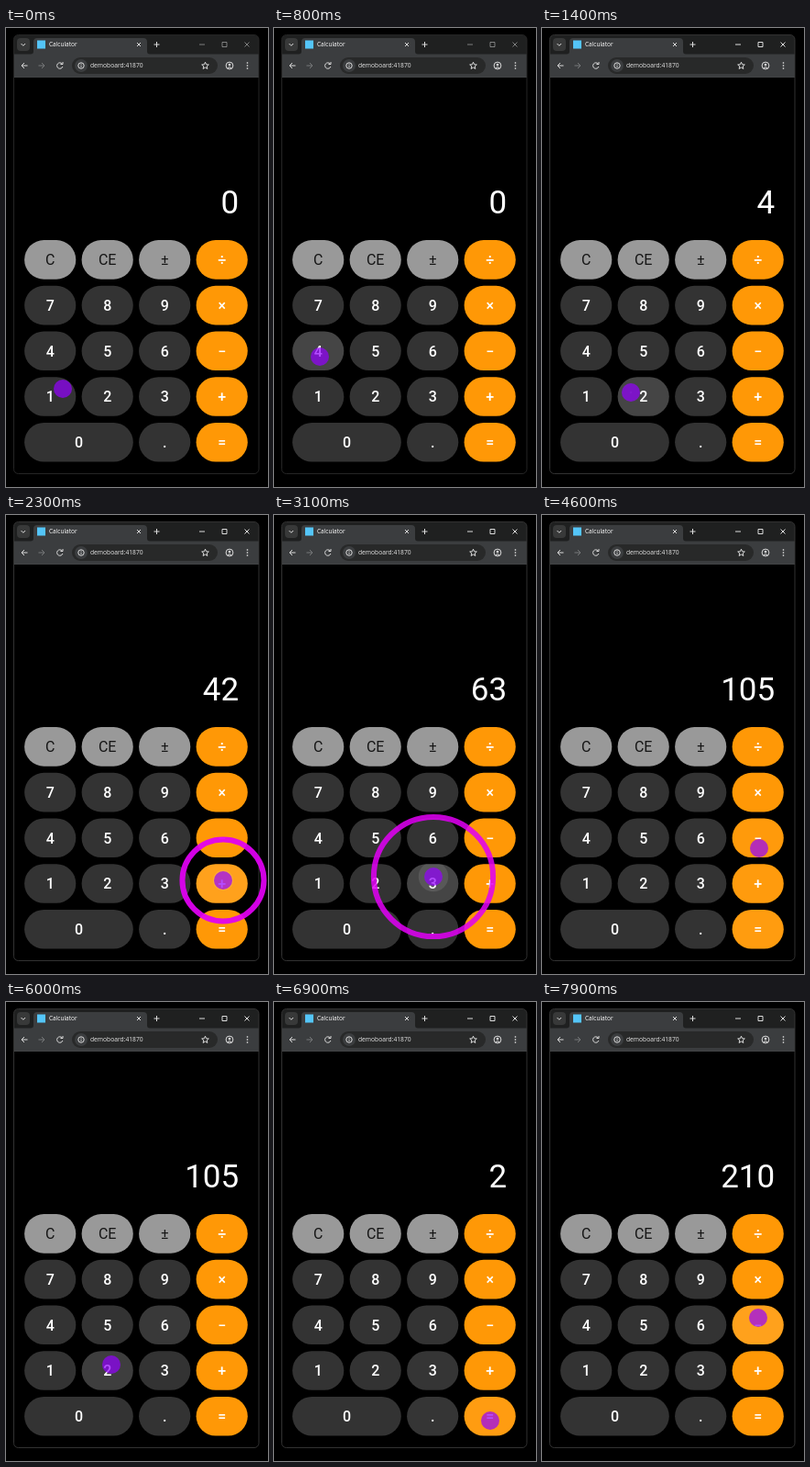
Recreate the animation shown at these times as an HTML page. Size 286x500 px, loop 8000 ms.

```html
<!DOCTYPE html>
<html lang="en">
<head>
<meta charset="utf-8">
<title>Calculator</title>
<style>
  html, body { margin: 0; width: 100%; height: 100%; overflow: hidden; background: #000; }
  svg { display: block; width: 286px; height: 500px; }
  .ui { font-family: "Open Sans", "Noto Sans", sans-serif; }
  .key, #display { font-family: Roboto, sans-serif; }
  .key { font-size: 16px; font-weight: 500; text-anchor: middle; fill: #fff; }
  .key.soft { font-weight: 400; fill: #161616; }
  #display { font-size: 35px; text-anchor: end; fill: #fff; }
  .line { fill: none; stroke: #dcdcdc; stroke-width: 1; }
</style>
</head>
<body>
<svg id="stage" viewBox="0 0 286 500" xmlns="http://www.w3.org/2000/svg">
  <defs id="defs"></defs>
  <rect width="286" height="500" fill="#000"/>
  <!-- browser window -->
  <path d="M8.5 54V13q0-5 5-5H271q5 0 5 5V54Z" fill="#1f2020"/>
  <path d="M9 53.5V28.5H27q3 0 3-3V15q0-4 4-4H150q4 0 4 4V25.5q0 3 3 3H276V53.5Z" fill="#3b3d3f"/>
  <path d="M9 53.5H276" stroke="#4a4b4c" stroke-width=".7"/>
  <rect id="frame" x="8.5" y="7.5" width="267.5" height="478" rx="5" fill="none" stroke="#2e2e2e" stroke-width=".9"/>
  <rect x="12" y="11" width="14" height="14" rx="4" fill="#383939"/>
  <path class="line" d="M16.500 17l2.300 2.300 2.300-2.300"/>
  <rect x="34" y="13.500" width="9" height="9" fill="#54c5f8"/>
  <text class="ui" x="47" y="20.300" font-size="6.500" fill="#fff">Calculator</text>
  <path class="line" d="M143 16l4 4m0-4l-4 4M161.500 18h6m-3-3v6"/>
  <path id="controls" class="line" d="M211 18h6M236 15.500h5v5h-5ZM260.500 15.500l5 5m0-5l-5 5"/>
  <path class="line" d="M23.500 41h-6.500m3-3l-3 3 3 3"/>
  <path class="line" d="M35.500 41h6.500m-3-3l3 3-3 3" style="stroke:#77797a"/>
  <path class="line" d="M61.300 39a3.200 3.200 0 1 0 .6 3M62 37v2.500h-2.500"/>
  <rect x="72" y="32" width="159" height="18" rx="9" fill="#282929"/>
  <circle cx="82" cy="41" r="7" fill="#3b3d3f"/>
  <circle class="line" cx="82" cy="41" r="3.200"/>
  <path class="line" d="M82 40.700v2M82 39v.8"/>
  <text class="ui" x="92" y="43.300" font-size="6.700" fill="#e8e8e8">demoboard:41870</text>
  <path id="star" class="line"/>
  <circle class="line" cx="244" cy="41" r="3.900"/>
  <circle cx="244" cy="40" r="1.300" fill="#dcdcdc"/>
  <path class="line" d="M241.700 43.700q2.300-2 4.600 0"/>
  <path d="M263.500 37.300v1.400m0 1.600v1.400m0 1.600v1.400" stroke="#dcdcdc" stroke-width="1.400"/>
  <!-- calculator -->
  <text id="display" x="254.200" y="201.700"></text>
  <g id="keys"></g>
  <g id="rings" fill="none" stroke="rgb(225,0,245)" stroke-width="6"></g>
  <circle id="pointer" r="10" fill="rgb(148,0,255)" fill-opacity=".7"/>
</svg>
<script>
const LOOP = 8000, STEP = 100;
const RING_DELAY = 15, RING_MS = 415, RING_SPEED = 0.42, TAP_MS = 120;
const KEY_W = 56.2, KEY_H = 42.6, PITCH_X = 62.5, PITCH_Y = 49.7;
const $ = id => document.getElementById(id);

function add(parent, tag, attrs, text) {
  const el = document.createElementNS("http://www.w3.org/2000/svg", tag);
  set(el, attrs);
  if (text) el.textContent = text;
  parent.appendChild(el);
  return el;
}
function set(el, attrs) {
  for (const name in attrs) el.setAttribute(name, attrs[name]);
}

// pointer stops: time, x, y
const path = [
  [0, 62, 393], [500, 52, 362], [800, 50, 358], [950, 50, 358],
  [1250, 97, 397], [1500, 97, 397], [2080, 237, 398], [2350, 237, 398],
  [2600, 174, 350], [2700, 174, 350], [2880, 174, 394], [3150, 174, 394],
  [3600, 231, 444], [3800, 221, 435], [4450, 221, 435], [4600, 237, 363],
  [4900, 241, 298], [5200, 241, 298], [5500, 213, 317], [5700, 216, 319],
  [5920, 115, 395], [6500, 115, 395], [6900, 236, 456], [7250, 236, 456],
  [7700, 236, 344], [8000, 236, 344]
];

// press time and what the display shows after release
const clicks = [
  [820, "4"], [1388, "42"], [2194, "42"], [2640, "6"], [2945, "63"],
  [3990, "105"], [5098, "105"], [6340, "2"], [7010, "210"]
].map(([at, shows]) => {
  const [x, y] = pointerAt(at);
  return { at, shows, x, y, ring: add($("rings"), "circle", { cx: x, cy: y }) };
});

const keys = [];
["C|CE|±|÷", "7|8|9|×", "4|5|6|−", "1|2|3|+", "0||.|="].forEach((row, r) =>
  row.split("|").forEach((label, c) => {
    if (label) keys.push(makeKey(label, r, c));
  }));

function makeKey(label, r, c) {
  const x = 20.1 + c * PITCH_X, y = 231.1 + r * PITCH_Y;
  const w = label === "0" ? KEY_W + PITCH_X : KEY_W;
  const box = { x, y, width: w, height: KEY_H, rx: KEY_H / 2 };
  const soft = r === 0 && c < 3;
  const fill = c === 3 ? "#ff9806" : soft ? "#999" : "#333";
  const id = "clip" + r + c;
  add(add($("defs"), "clipPath", { id }), "rect", box);
  const g = add($("keys"), "g", {});
  add(g, "rect", { ...box, fill });
  const glow = add(g, "rect", { ...box, fill: "#fff" });
  const splash = add(g, "circle", { fill: "#fff", "clip-path": `url(#${id})` });
  add(g, "text", {
    class: soft ? "key soft" : "key", x: x + w / 2, y: y + KEY_H / 2 + 5.7
  }, label);
  return { x, y, w, glow, splash };
}

function inside(key, [px, py]) {
  const rad = KEY_H / 2;
  const cx = Math.min(Math.max(px, key.x + rad), key.x + key.w - rad);
  return Math.hypot(px - cx, py - key.y - rad) < rad;
}

function pointerAt(t) {
  const i = Math.max(1, path.findIndex(p => p[0] >= t));
  const [t0, x0, y0] = path[i - 1], [t1, x1, y1] = path[i];
  const u = (t - t0) / (t1 - t0), s = u * u * (3 - 2 * u);
  return [x0 + (x1 - x0) * s, y0 + (y1 - y0) * s];
}

// the highlight trails the pointer over the last quarter second
function hoverLevel(key, t) {
  let hits = 0;
  for (let i = 0; i < 10; i++) {
    const s = t - i * 25;
    if (s > 0 && inside(key, pointerAt(s))) hits++;
  }
  return hits / 10;
}

function drawStar() {
  let d = "";
  for (let i = 0; i < 10; i++) {
    const a = i * Math.PI / 5, r = i % 2 ? 1.8 : 4;
    d += (i ? "L" : "M") + (217.5 + r * Math.sin(a)).toFixed(2) + " " + (41.2 - r * Math.cos(a)).toFixed(2);
  }
  set($("star"), { d: d + "Z" });
}

function draw(t) {
  const [x, y] = pointerAt(t);
  set($("pointer"), { cx: x, cy: y });

  let shown = "0";
  for (const c of clicks) {
    const age = t - c.at, live = age > RING_DELAY && age < RING_MS;
    if (age >= TAP_MS) shown = c.shows;
    set(c.ring, {
      r: live ? age * RING_SPEED : 0,
      opacity: live ? 1 - (age / RING_MS) ** 2 : 0
    });
  }
  $("display").textContent = shown;

  for (const key of keys) {
    set(key.glow, { opacity: 0.09 * hoverLevel(key, t) });
    const c = clicks.find(c => t > c.at && t < c.at + 400 && inside(key, [c.x, c.y]));
    const age = c ? t - c.at : 0;
    set(key.splash, {
      cx: c ? c.x : 0, cy: c ? c.y : 0, r: age * 0.105,
      opacity: c ? 0.1 * Math.min(1, (400 - age) / 200) : 0
    });
  }

  const focused = t >= 900;
  set($("controls"), { opacity: focused ? 1 : 0.5 });
  set($("frame"), { stroke: focused ? "#383838" : "#2a2a2a" });
}

function tick(now) {
  draw(Math.floor(now % LOOP / STEP) * STEP);
  requestAnimationFrame(tick);
}
drawStar();
draw(0);
requestAnimationFrame(tick);
</script>
</body>
</html>
```
